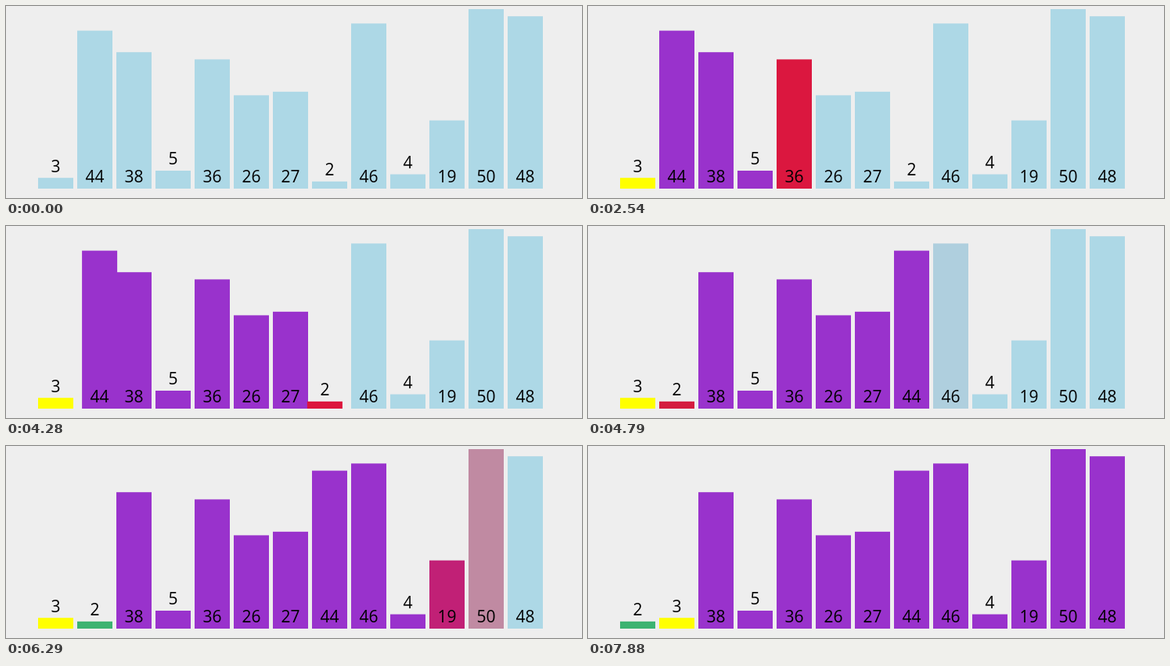
These frames come from a looping animation (736 px wide and 246 px high, 8 s). An HTML page:

```html
<!DOCTYPE html>
<html lang="en">
<head>
<meta charset="utf-8">
<title>Quick sort partition</title>
<style>
  html, body { margin: 0; width: 100%; height: 100%; overflow: hidden; background: #eee; }
  svg { display: block; width: 100%; height: 100%; }
  text { font: 21px "Open Sans", "Noto Sans", sans-serif; text-anchor: middle; }
</style>
</head>
<body>
<svg id="stage" viewBox="0 0 736 246"></svg>
<script>
const LOOP = 8000, TICK = 30, TICK_OFFSET = 20, DURATION = 250;
const BASE = 234, LEFT = 41, PITCH = 50, BAR_WIDTH = 45, UNIT = 4.6;

const IDLE = [173, 216, 230], PIVOT = [255, 255, 0], CURRENT = [220, 20, 60],
      LARGER = [153, 50, 204], SMALLER = [60, 179, 113];

const values = [3, 44, 38, 5, 36, 26, 27, 2, 46, 4, 19, 50, 48];

// Each step starts at a time and recolours bars or swaps two of them.
const steps = [
  { start: 410, colors: { 3: PIVOT } },
  { start: 890, colors: { 44: CURRENT } },
  { start: 1373, colors: { 44: LARGER, 38: CURRENT } },
  { start: 1853, colors: { 38: LARGER, 5: CURRENT } },
  { start: 2330, colors: { 5: LARGER, 36: CURRENT } },
  { start: 2813, colors: { 36: LARGER, 26: CURRENT } },
  { start: 3293, colors: { 26: LARGER, 27: CURRENT } },
  { start: 3740, colors: { 27: LARGER, 2: CURRENT } },
  { start: 4237, swap: [44, 2] },
  { start: 4733, colors: { 2: SMALLER, 46: CURRENT } },
  { start: 5208, colors: { 46: LARGER, 4: CURRENT } },
  { start: 5690, colors: { 4: LARGER, 19: CURRENT } },
  { start: 6174, colors: { 19: LARGER, 50: CURRENT } },
  { start: 6653, colors: { 50: LARGER, 48: CURRENT } },
  { start: 7130, colors: { 48: LARGER } },
  { start: 7610, swap: [3, 2] }
];

const stage = document.getElementById("stage");

function add(parent, tag, attributes = {}) {
  const node = document.createElementNS("http://www.w3.org/2000/svg", tag);
  for (const name in attributes) node.setAttribute(name, attributes[name]);
  return parent.appendChild(node);
}

const bars = values.map(value => {
  const height = value * UNIT, top = BASE - height;
  const group = add(stage, "g");
  const rect = add(group, "rect", { y: top, width: BAR_WIDTH, height });
  const label = add(group, "text", { x: BAR_WIDTH / 2, y: value < 10 ? top - 7.7 : 226 });
  label.textContent = value;
  return { value, group, rect };
});

const mix = (a, b, p) => a + (b - a) * p;

function cubicInOut(x) {
  x = Math.min(1, Math.max(0, x));
  return x < 0.5 ? 4 * x ** 3 : 1 - 4 * (1 - x) ** 3;
}

function draw(time) {
  const color = {}, slot = {};
  values.forEach((value, i) => { color[value] = IDLE; slot[value] = i; });

  for (const { start, colors = {}, swap } of steps) {
    const p = cubicInOut((time - start) / DURATION);
    for (const value in colors)
      color[value] = color[value].map((c, i) => mix(c, colors[value][i], p));
    if (swap) {
      const [a, b] = swap, from = slot[a], to = slot[b];
      slot[a] = mix(from, to, p);
      slot[b] = mix(to, from, p);
    }
  }

  for (const { value, group, rect } of bars) {
    group.setAttribute("transform", `translate(${LEFT + PITCH * slot[value]} 0)`);
    rect.setAttribute("fill", `rgb(${color[value].map(Math.round)})`);
  }
}

function frame() {
  const time = performance.now() % LOOP;
  draw(Math.floor((time - TICK_OFFSET) / TICK) * TICK + TICK_OFFSET);
  requestAnimationFrame(frame);
}
frame();
</script>
</body>
</html>
```
